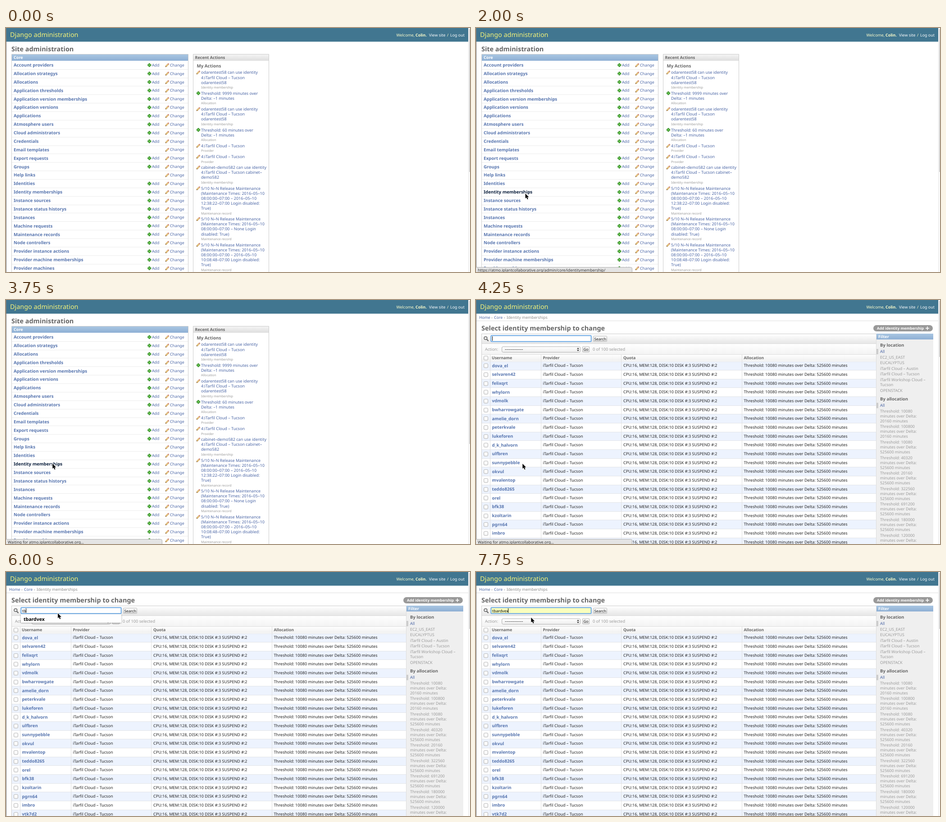
Animation of 1030x544 px, one loop 8000 ms. Source, as an HTML page with a canvas:

```html
<!DOCTYPE html>
<html lang="en">
<head>
<meta charset="utf-8">
<title>Admin search</title>
<style>
html, body { margin: 0; width: 100%; height: 100%; overflow: hidden; background: #fff; }
canvas { display: block; }
</style>
</head>
<body>
<canvas id="stage" width="1030" height="544"></canvas>
<script>
const ctx = document.getElementById('stage').getContext('2d');
const LOOP = 8000, STEP = 250;
const LINK = '#5674ae', SOFT_LINK = '#4a65a5', GREY = '#999', HEAD = '#666', INK = '#222';
const CLOUD = 'iTarfil Cloud';
const SEARCH_NAME = 'tbardvex';
const HOVER_ROW = 15;

const MODELS = ['Account providers', 'Allocation strategys', 'Allocations', 'Application thresholds',
  'Application version memberships', 'Application versions', 'Applications', 'Atmosphere users',
  'Cloud administrators', 'Credentials', 'Email templates', 'Export requests', 'Groups', 'Help links',
  'Identities', 'Identity memberships', 'Instance sources', 'Instance status historys', 'Instances',
  'Machine requests', 'Maintenance records', 'Node controllers', 'Provider instance actions',
  'Provider machine memberships', 'Provider machines'];
const NO_ADD = ['Email templates', 'Help links'];

const identityAction = { lines: ['odarentest58 can use identity', `4:${CLOUD} - Tucson`, 'odarentest58'], kind: 'Identity membership' };
const providerAction = { lines: [`4:${CLOUD} - Tucson`], kind: 'Provider' };
const threshold = n => ({ add: true, lines: [`Threshold: ${n} minutes over`, 'Delta: -1 minutes'], kind: 'Allocation' });
const release = (...rest) => ({
  lines: ['5/10 N-N Release Maintenance', '(Maintenance Times: 2016-05-10', ...rest],
  kind: 'Maintenance record'
});
const ACTIONS = [
  identityAction, threshold(9999), identityAction, threshold(60), providerAction, providerAction,
  { lines: ['cabinet-demo582 can use identity', `4:${CLOUD} - Tucson cabinet-`, 'demo582'], kind: 'Identity membership' },
  release('08:00:00-07:00 - 2016-05-10', '12:38:22-07:00 Login disabled:', 'True)'),
  release('08:00:00-07:00 - None Login', 'disabled: True)'),
  release('08:00:00-07:00 - 2016-05-10', '10:08:48-07:00 Login disabled:', 'True)')
];

const USERS = ['dova_el', 'selvaren42', 'felixqrt', 'whylorn', 'vdmolk', 'bwharrowgate', 'amelie_dorn',
  'peterkvale', 'lukeforen', 'd_k_halvorn', 'ulfbren', 'sunnypebble', 'okvul', 'mvalentop', 'teddo8265',
  'orel', 'bfk38', 'kzoltarin', 'pgrn64', 'imbro', 'vtk7d2'];

const LOCATIONS = [[127.5, 'EC2_US_EAST'], [140, 'EUCALYPTUS'], [153, `${CLOUD} - Austin`],
  [165.3, `${CLOUD} - Tucson`], [178, 'iTarfil Workshop Cloud -'], [189, 'Tucson'], [201.5, 'OPENSTACK']];
const QUOTAS = [[10080, 20160], [100800, 20160], [10080, 525600], [40320, 525600], [20160, 525600],
  [322560, 525600], [691200, 525600], [180000, 525600], [120000, 525600]];

// Each key holds until the next: time, then value(s).
const POINTER = [[250, 588, 109], [500, 430, 172], [750, 250, 250], [1000, 130, 304], [1250, 75, 326],
  [1500, 92, 345], [1750, 106, 362], [2000, 109.5, 369], [2250, 98, 370], [2500, 86, 369],
  [2750, 92, 367], [3000, 99, 366], [3250, 103.3, 365], [4500, 104, 330], [4750, 108, 230],
  [5000, 113, 140], [5250, 115, 92], [7000, 118, 88], [7250, 120.7, 84], [7500, 122, 98], [7750, 122.3, 101.5]];
const STATUS = [[1750, 'https://atmo.iplantcollaborative.org/admin/core/identitymembership/'],
  [3750, 'Waiting for atmo.iplantcollaborative.org...'], [4500, '']];
const TYPED = [[0, 0], [6000, 2], [6250, 3], [6500, 5], [7500, 8]];

const held = (keys, t) => keys.filter(k => k[0] <= t).pop();

function rect(x, y, w, h, fill) {
  ctx.fillStyle = fill;
  ctx.fillRect(x, y, w, h);
}

function fade(y, h, from, to) {
  const g = ctx.createLinearGradient(0, y, 0, y + h);
  g.addColorStop(0, from);
  g.addColorStop(1, to);
  return g;
}

function box(x, y, w, h, r, fill, stroke, width = 1) {
  ctx.beginPath();
  ctx.roundRect(x, y, w, h, r);
  ctx.fillStyle = fill;
  ctx.fill();
  if (!stroke) return;
  ctx.strokeStyle = stroke;
  ctx.lineWidth = width;
  ctx.stroke();
}

function line(x1, y1, x2, y2, color, width) {
  ctx.beginPath();
  ctx.moveTo(x1, y1);
  ctx.lineTo(x2, y2);
  ctx.strokeStyle = color;
  ctx.lineWidth = width;
  ctx.stroke();
}

// y is the middle of the capitals; hyphens are set wide.
function text(s, x, y, size, color, weight = 400) {
  ctx.font = `${weight} ${size}px "Noto Sans", "Open Sans", sans-serif`;
  ctx.fillStyle = color;
  ctx.fillText(s.replace(/-/g, '–'), x, y + size * 0.35);
}
const bold = (s, x, y, size, color) => text(s, x, y, size, color, 700);

function plus(x, y) {
  for (const [r, w, c] of [[4, 3.6, '#2c8420'], [3, 1.6, '#6cc653']]) {
    line(x - r, y, x + r, y, c, w);
    line(x, y - r, x, y + r, c, w);
  }
}

function pencil(x, y) {
  line(x - 3.2, y + 3.2, x + 2.6, y - 2.6, '#c08a3c', 3.2);
  line(x - 2.6, y + 2.6, x + 2, y - 2, '#f7e0a0', 1.5);
  line(x + 1.8, y - 1.8, x + 3.4, y - 3.4, '#d28a86', 3);
  line(x - 4, y + 4, x - 2.8, y + 2.8, '#6b5030', 1.5);
}

function drawChrome(thumbEnd) {
  rect(0, 0, 1030, 544, '#fff');
  rect(0, 0, 1026, 30.5, '#417690');
  text('Django administration', 9, 15, 14.4, '#f4f379', 500);
  text('Welcome,', 866.5, 16, 8.9, '#ffffcc', 500);
  bold('Colin.', 909, 16, 8.9, '#ffffcc');
  text('View site', 939, 16, 8.9, '#fff', 500);
  text('/', 979, 16, 8.9, '#ffffcc', 500);
  text('Log out', 986, 16, 8.9, '#fff', 500);
  rect(1026, 0, 4, 544, '#fafafa');
  rect(1026, 0, 1, 544, '#e8e8e8');
  rect(1028.5, 2, 1.5, thumbEnd - 2, '#c4c4c4');
  rect(0, 0, 1, 544, '#777');
}

function drawIndex(hover) {
  drawChrome(321);
  bold('Site administration', 12, 47, 14.4, HEAD);

  box(12.5, 58.5, 392, 500, 0, '#fff', '#ccc');
  rect(13, 59, 391, 14, fade(59, 14, '#a9c6e2', '#8eafd4'));
  bold('Core', 17, 66.3, 9.1, '#fff');
  MODELS.forEach((name, i) => {
    const y = 82.7 + i * 18.87;
    rect(13, Math.round(y + 9), 391, 1, '#ececec');
    bold(name, 17, y, 9.75, hover && i === HOVER_ROW ? '#0a1e3c' : LINK);
    if (!NO_ADD.includes(name)) {
      plus(318.3, y);
      text('Add', 324, y, 8.8, SOFT_LINK);
    }
    pencil(358, y);
    text('Change', 364, y, 8.8, SOFT_LINK);
  });

  box(415.5, 58.5, 168, 500, 0, '#fff', '#ccc');
  rect(416, 59, 167, 14, fade(59, 14, '#f4f4f4', '#dedede'));
  bold('Recent Actions', 419.5, 66.3, 9, HEAD);
  bold('My Actions', 423.5, 84.7, 9.8, HEAD);
  let y = 99.3;
  for (const { add, lines, kind } of ACTIONS) {
    (add ? plus : pencil)(427, y - 0.3);
    for (const s of lines) {
      text(s, 433, y, 9.05, SOFT_LINK);
      y += 11.1;
    }
    text(kind, 433, y, 7.2, GREY);
    y += 13.1;
  }
}

function checkbox(y) {
  box(17.5, y - 4.5, 9, 9, 2, fade(y - 4, 9, '#fff', '#f4f4f4'), '#b0b0b0');
}

function button(label, x, y, w) {
  box(x + 0.5, y + 0.5, w - 1, 12, 1, fade(y, 13, '#fff', '#dcdcdc'), '#b5b5b5');
  text(label, x + 2.5, y + 6.8, 8.4, INK);
}

function drawTable() {
  rect(13, 121, 876, 15, fade(121, 15, '#fff', '#f0f0f0'));
  rect(13, 121, 876, 1, '#ddd');
  checkbox(129.5);
  [['Username', 35], ['Provider', 148.5], ['Quota', 327], ['Allocation', 594.5]]
    .forEach(([s, x]) => bold(s, x, 129, 8.8, HEAD));
  USERS.forEach((name, i) => {
    const top = 136.5 + i * 19.66, y = top + 9.8;
    rect(13, Math.round(top), 876, 20, i % 2 ? '#fff' : '#edf3fe');
    rect(13, Math.round(top), 876, 1, '#e2e4e8');
    checkbox(Math.round(y) + 0.5);
    bold(name, 35.5, y, 9.65, LINK);
    text(`${CLOUD} - Tucson`, 148.5, y, 9, INK);
    text('CPU:16, MEM:128, DISK:10 DISK #:3 SUSPEND #:2', 327, y, 9, INK);
    text('Threshold: 10080 minutes over Delta: 525600 minutes', 594.5, y, 9.1, INK);
  });
  for (const x of [31, 144, 322, 590]) rect(x, 121, 1, 423, '#dfdfdf');
}

function drawFilter() {
  rect(889, 75, 126, 469, '#efefef');
  rect(888, 75, 1, 469, '#ddd');
  rect(889, 75, 126, 13, fade(75, 13, '#a9c6e2', '#8eafd4'));
  bold('Filter', 893, 82, 9, '#fff');
  for (const [y, title] of [[100.5, 'By location'], [220.7, 'By allocation']]) {
    bold(title, 897, y, 9.6, HEAD);
    rect(889, y + 8.5, 4, 12, '#ccc');
    text('All', 897, y + 14.5, 9, SOFT_LINK);
  }
  for (const [y, s] of LOCATIONS) text(s, 897, y, 8.9, GREY);
  QUOTAS.forEach(([limit, delta], i) => {
    const y = 247.7 + i * 34.6;
    [`Threshold: ${limit}`, 'minutes over Delta:', `${delta} minutes`]
      .forEach((s, k) => text(s, 897, y + k * 11, 8.9, GREY));
  });
}

function drawToolbar(t) {
  rect(13, 76, 876, 21, fade(76, 21, '#fff', '#e6e6e6'));
  rect(13, 97, 876, 1, '#ddd');
  rect(13, 98, 876, 23, fade(98, 23, '#fff', '#f3f3f3'));
  rect(12, 75, 877, 1, '#ccc');
  rect(12, 75, 1, 469, '#ccc');

  ctx.beginPath();
  ctx.arc(21.3, 85, 3.3, 0, Math.PI * 2);
  ctx.strokeStyle = HEAD;
  ctx.lineWidth = 1.6;
  ctx.stroke();
  line(23.8, 87.6, 27.5, 91.5, HEAD, 2.2);

  const filled = t >= 7500;
  box(32, 78, 225, 16, 3, '#b9d7f5');
  box(33.5, 79.5, 222, 13, 1, filled ? '#faffbd' : '#fff', '#5c9fe0', 1.5);
  const typed = SEARCH_NAME.slice(0, held(TYPED, t)[1]);
  text(typed, 36, 86.5, 8.7, '#000');
  const blinkOff = t >= 7000 && t < 7500;
  if (!blinkOff) rect(Math.round(35.5 + ctx.measureText(typed).width), 81, 1, 10, '#000');
  button('Search', 260, 80, 31);

  text('Action:', 20, 109.7, 9, GREY);
  box(57.5, 104, 174, 12.5, 3, fade(104, 12, '#fff', '#eee'), '#b0b0b0');
  text('---------', 64, 110, 9, INK);
  ctx.fillStyle = '#333';
  for (const d of [-1, 1]) {
    ctx.beginPath();
    ctx.moveTo(224, 110.2 + d);
    ctx.lineTo(229, 110.2 + d);
    ctx.lineTo(226.5, 110.2 + d * 4);
    ctx.fill();
  }
  button('Go', 236, 103.5, 16);
  text('0 of 100 selected', 259, 109.7, 9.15, GREY);
}

function drawSuggestion(active) {
  ctx.save();
  ctx.shadowColor = 'rgba(0,0,0,.35)';
  ctx.shadowBlur = 3;
  ctx.shadowOffsetY = 1;
  rect(33, 94, 223, 19, '#fff');
  ctx.restore();
  if (active) rect(33, 97, 223, 15, '#dcdcdc');
  bold(SEARCH_NAME, 39, 105, 10.5, '#000');
}

function drawList(t) {
  drawChrome(127);
  rect(1, 46, 1025, 1, '#ddd');
  text('Home', 7, 39, 8.7, SOFT_LINK);
  text('›', 34, 39, 8.7, GREY);
  text('Core', 40, 39, 8.7, SOFT_LINK);
  text('›', 62, 39, 8.7, GREY);
  text('Identity memberships', 68, 39, 8.75, '#888');
  bold('Select identity membership to change', 12, 62.5, 14.45, HEAD);
  box(882, 56, 132, 14, 7, '#999');
  bold('Add identity membership', 890, 63, 8.2, '#fff');
  line(998, 63, 1006, 63, '#fff', 1.6);
  line(1002, 59, 1002, 67, '#fff', 1.6);
  drawToolbar(t);
  drawTable();
  drawFilter();
  if (t >= 6000 && t < 7750) drawSuggestion(t >= 7500);
}

function drawStatus(label) {
  box(-2, 533.5, 348.5, 20, [0, 3, 0, 0], '#e4e4e4', '#b0b0b0');
  text(label, 4, 539.5, 8.63, '#333');
}

function drawPointer(x, y) {
  ctx.beginPath();
  [[0, 0], [0, 11], [2.5, 8.8], [4.3, 13], [6.3, 12.2], [4.5, 8.2], [7.9, 8.2]]
    .forEach(([dx, dy]) => ctx.lineTo(x + dx, y + dy));
  ctx.closePath();
  ctx.lineJoin = 'round';
  ctx.strokeStyle = '#fff';
  ctx.lineWidth = 1.8;
  ctx.stroke();
  ctx.fillStyle = '#000';
  ctx.fill();
}

function draw(now) {
  const t = Math.floor((now % LOOP) / STEP) * STEP;
  ctx.textRendering = 'geometricPrecision';
  if (t < 4250) drawIndex(t >= 1750);
  else drawList(t);
  const status = held(STATUS, t);
  if (status && status[1]) drawStatus(status[1]);
  const spot = held(POINTER, t);
  if (spot) drawPointer(spot[1], spot[2]);
}

const start = performance.now();
function tick() {
  draw(performance.now() - start);
  requestAnimationFrame(tick);
}
tick();
</script>
</body>
</html>
```
